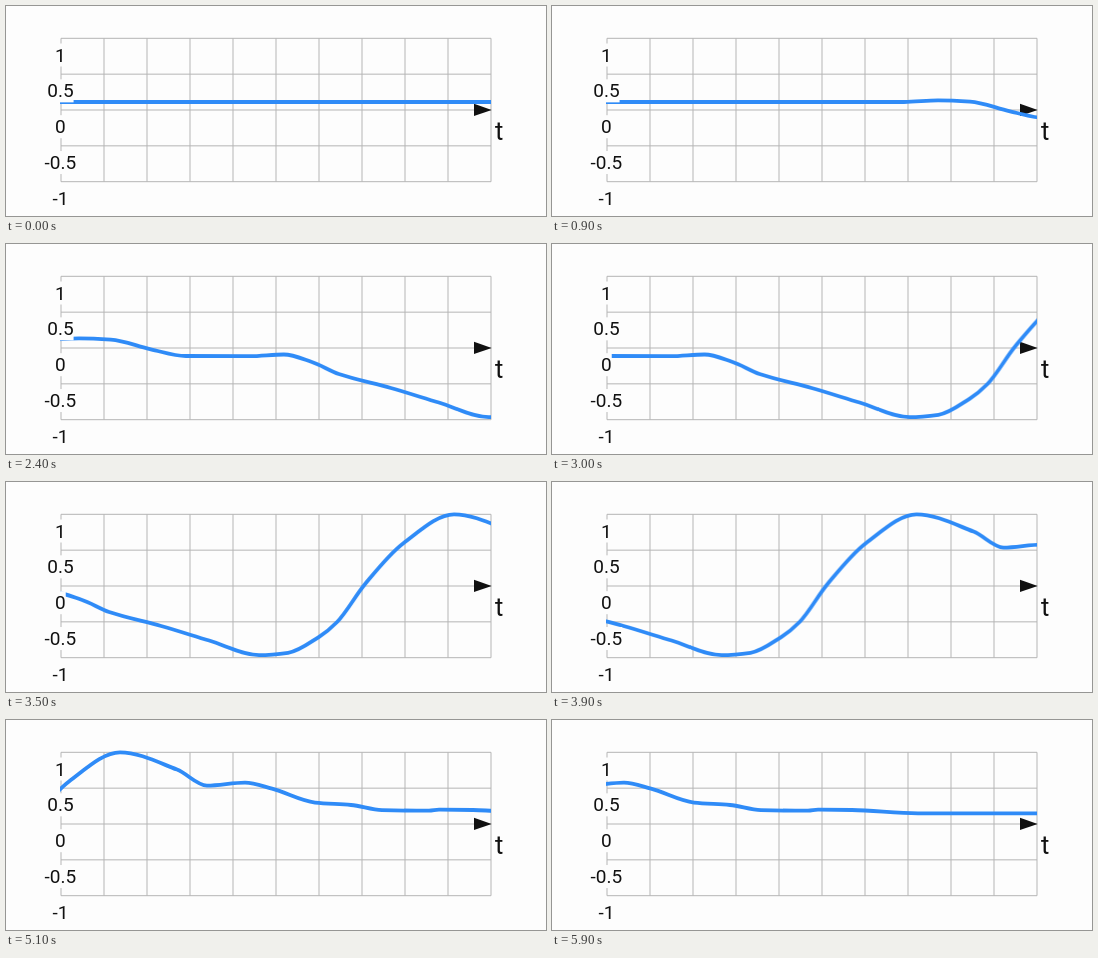
Animation, 540 px wide and 210 px high, one loop 6000 ms. Source, as an HTML page:

```html
<!DOCTYPE html>
<html lang="en">
<head>
<meta charset="utf-8">
<title>Scrolling signal</title>
<style>
html, body { margin: 0; width: 100%; height: 100%; overflow: hidden; background: #fdfdfd; }
svg { display: block; width: 540px; height: 210px; }
text { font-family: Roboto, Arial, sans-serif; font-size: 19px; fill: #111; }
.label { text-anchor: middle; }
.backing { fill: #fdfdfd; }
.unit { font-size: 25.5px; }
#grid { stroke: #b5b5b5; stroke-width: 1; fill: none; }
/* Ten advances per second; the small delay keeps steps clear of rounding. */
#curve {
  fill: none; stroke: #2f8bf7; stroke-width: 3.8; stroke-linejoin: round;
  animation: scroll 6s steps(60) -5ms infinite;
}
@keyframes scroll {
  from { transform: translateX(334px); }
  to   { transform: translateX(-919px); }
}
</style>
</head>
<body>
<svg viewBox="0 0 540 210">
  <clipPath id="plot"><rect x="54.5" y="20" width="430.5" height="170"/></clipPath>
  <path id="grid"/>
  <path d="M468 97.7 L485.7 103.9 L468 110.1 Z" fill="#111"/>
  <g clip-path="url(#plot)"><path id="curve"/></g>
  <g id="labels"></g>
  <text class="unit" x="489" y="134.2">t</text>
</svg>
<script>
const LEFT = 55, TOP = 32.3, CELL_W = 43, CELL_H = 35.85, ROWS = 4, COLS = 10;

function gridPath() {
  let d = '';
  for (let row = 0; row <= ROWS; row++) d += `M${LEFT} ${TOP + row * CELL_H}h${COLS * CELL_W}`;
  for (let col = 0; col <= COLS; col++) d += `M${LEFT + col * CELL_W} ${TOP}v${ROWS * CELL_H}`;
  return d;
}

function addShape(parent, tag, attrs) {
  const el = document.createElementNS('http://www.w3.org/2000/svg', tag);
  for (const key in attrs) el.setAttribute(key, attrs[key]);
  return parent.appendChild(el);
}

// Each label sits on an opaque box that hides the grid and the trace.
function addLabel(value, row) {
  const group = document.getElementById('labels');
  const text = addShape(group, 'text', { class: 'label', x: 54.4, y: TOP + 23.2 + row * CELL_H });
  text.textContent = value;
  const { x, y, width, height } = text.getBBox();
  group.insertBefore(addShape(group, 'rect', { class: 'backing', x, y, width, height }), text);
}

// Monotone cubic through the points: no overshoot at bends.
function smoothPath(pts) {
  const slope = i => (pts[i + 1][1] - pts[i][1]) / (pts[i + 1][0] - pts[i][0]);
  const tangent = i => {
    if (i === 0 || i === pts.length - 1) return 0;
    const a = slope(i - 1), b = slope(i);
    return a * b > 0 ? 2 * a * b / (a + b) : 0;
  };
  let d = `M${pts[0]}`;
  for (let i = 1; i < pts.length; i++) {
    const [x0, y0] = pts[i - 1], [x1, y1] = pts[i], h = (x1 - x0) / 3;
    d += `C${x0 + h} ${y0 + h * tangent(i - 1)} ${x1 - h} ${y1 - h * tangent(i)} ${x1} ${y1}`;
  }
  return d;
}

// Key points of the signal: rest, dip, swing up, decay back to rest.
const signal = [
  [-400, 96], [206, 96], [240, 94.4], [272, 95.6], [312, 105.3], [347, 112],
  [411, 112.2], [445, 110.5], [473, 118], [500, 130], [552, 144], [600, 158.5],
  [650, 173.2], [679, 170.8], [710, 154.8], [728, 140], [756, 102], [794, 61.5],
  [845, 32.4], [902, 49.6], [932, 65.6], [970, 62.6], [997, 68.7], [1040, 82.6],
  [1076, 85], [1107, 90.1], [1154, 90.7], [1164, 89.7], [1198, 90], [1264, 93.4],
  [1420, 93.4]
];

document.getElementById('grid').setAttribute('d', gridPath());
document.getElementById('curve').setAttribute('d', smoothPath(signal));
['1', '0.5', '0', '-0.5', '-1'].forEach(addLabel);
</script>
</body>
</html>
```
